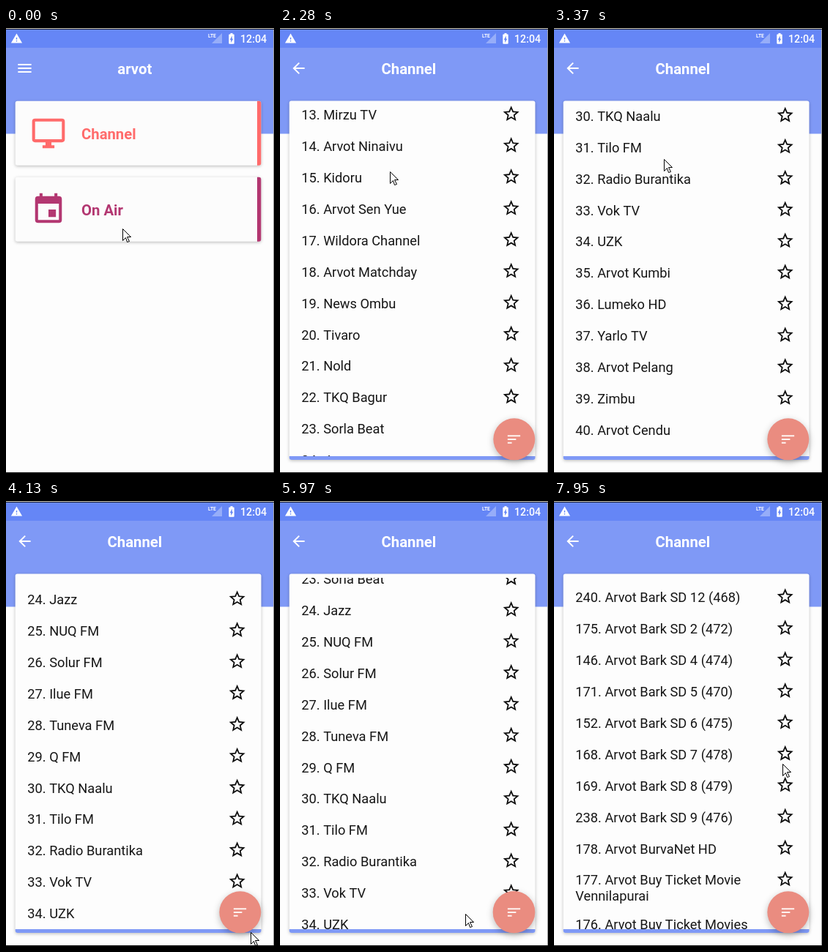
Write an HTML page with a canvas that moves like this. It is 366x608 px and loops after 8000 ms.

```html
<!DOCTYPE html>
<html lang="en">
<head>
<meta charset="utf-8">
<title>Channel list</title>
<style>
html, body { margin: 0; width: 100%; height: 100%; overflow: hidden; background: #fdfdfd; }
canvas { display: block; width: 366px; height: 608px; }
</style>
</head>
<body>
<canvas id="stage" width="366" height="608"></canvas>
<script>
const ctx = document.getElementById('stage').getContext('2d');
const LOOP = 8000, ROW = 42.9;
const BLUE = '#7f99f6', STATUS = '#6586f6', PAPER = '#fdfdfd';
const CORAL = '#ff6b6b', PLUM = '#b33771', SALMON = '#ea8c80';

const byId = 'QBU|Arvot Min Sao Kei|Arvot Lorma|Oru TV|Arvot Maarunal|KVD Lang Po|Fenwip Channel|Daymoor Channel|Arvot Bao Lin Sei|Arvot GrandMatch 2|KUX Movies|Arvot Dalima|Mirzu TV|Arvot Ninaivu|Kidoru|Arvot Sen Yue|Wildora Channel|Arvot Matchday|News Ombu|Tivaro|Nold|TKQ Bagur|Sorla Beat|Jazz|NUQ FM|Solur FM|Ilue FM|Tuneva FM|Q FM|TKQ Naalu|Tilo FM|Radio Burantika|Vok TV|UZK|Arvot Kumbi|Lumeko HD|Yarlo TV|Arvot Pelang|Zimbu|Arvot Cendu|Movie Tarn|Orvane HD|Arvot Tamu'
  .split('|').map((name, i) => `${i + 1}. ${name}`);

// The sorted list is only ever seen from this row on.
const FIRST = 22;
const byName = '61. Alumo|214. Alumo HD|34. Amvelu TV|207. Anduro HD|118. Aruvo|80. Arvot AHU|182. Arvot AHU HD|92. Arvot Andel|235. Arvot Andel HD|84. Arvot Avimo|77. Arvot Balfa|239. Arvot Bark (467)|148. Arvot Bark HD 3 (473)|119. Arvot Bark SD 1 (471)|173. Arvot Bark SD 10 (477)|242. Arvot Bark SD 11 (469)|240. Arvot Bark SD 12 (468)|175. Arvot Bark SD 2 (472)|146. Arvot Bark SD 4 (474)|171. Arvot Bark SD 5 (470)|152. Arvot Bark SD 6 (475)|168. Arvot Bark SD 7 (478)|169. Arvot Bark SD 8 (479)|238. Arvot Bark SD 9 (476)|178. Arvot BurvaNet HD|177. Arvot Buy Ticket Movie\nVennilapurai|176. Arvot Buy Ticket Movies'.split('|');

const smooth = u => u * u * (3 - 2 * u);
const easeOut = u => 1 - (1 - u) ** 3;
const ramp = (t, a, b) => Math.min(1, Math.max(0, (t - a) / (b - a)));

// Pointer moves; a drag also pulls the list, which coasts until `rest`.
const go = (start, end, x, y) => ({ start, end, x, y });
const drag = (start, end, x, y, rest) => ({ start, end, x, y, rest });
const moves = [
  go(60, 690, 143, 158),
  go(1040, 1340, 179, 209),
  go(1340, 1740, 190, 428),
  drag(1815, 2050, 150, 98, 2540),
  go(2100, 2560, 150, 385),
  drag(2710, 2850, 134, 75, 3370),
  go(2900, 3400, 150, 180),
  drag(3450, 3720, 190, 326, 4500),
  go(3750, 4130, 334, 589),
  go(4130, 4260, 352, 606),
  go(4260, 4610, 326, 566),
  go(5000, 5320, 254, 565),
  go(5900, 6450, 240, 543),
  drag(6590, 6965, 184, 30, 7290),
  go(6990, 7290, 205, 106),
  go(7350, 7650, 324, 365),
  go(7830, 7950, 312, 359)
];

// Coasting starts at the drag's own speed and slows down cubically.
function motion(t) {
  let x = 159, y = 274, scroll = 0;
  for (const m of moves) {
    if (t <= m.start) break;
    const u = ramp(t, m.start, m.end);
    if (m.rest) {
      const pull = y - m.y;
      const coast = pull / (m.end - m.start) * (m.rest - m.end) / 3;
      scroll += pull * u + coast * easeOut(ramp(t, m.end, m.rest));
    }
    const e = m.rest ? u : smooth(u);
    x += (m.x - x) * e;
    y += (m.y - y) * e;
  }
  return { x, y, scroll };
}

function rect(x, y, w, h, color) {
  ctx.fillStyle = color;
  ctx.fillRect(x, y, w, h);
}

function round(x, y, w, h, r, color, shadow = 0) {
  ctx.save();
  if (shadow) {
    ctx.shadowColor = 'rgba(0,0,0,.26)';
    ctx.shadowBlur = shadow * 2;
    ctx.shadowOffsetY = shadow * 0.6;
  }
  ctx.beginPath();
  ctx.roundRect(x, y, w, h, r);
  ctx.fillStyle = color;
  ctx.fill();
  ctx.restore();
}

function text(str, x, y, size, color, weight = 400, align = 'left') {
  ctx.font = `${weight} ${size}px Roboto, sans-serif`;
  ctx.textAlign = align;
  ctx.fillStyle = color;
  ctx.fillText(str, x, y);
}

function poly(...points) {
  points.forEach(([x, y], i) => i ? ctx.lineTo(x, y) : ctx.moveTo(x, y));
  ctx.closePath();
}

function starRing(outer, inner) {
  poly(...Array.from({ length: 10 }, (_, i) => {
    const r = i % 2 ? inner : outer, a = i * Math.PI / 5;
    return [12 + r * Math.sin(a), 12.5 - r * Math.cos(a)];
  }));
}

function bars(...widths) {
  widths.forEach((w, i) => ctx.rect(3, 6 + 5 * i, w, 2));
}

// Icons live on a 24-unit grid; overlapping parts cut holes.
const icons = {
  menu() { bars(18, 18, 18); },
  sort() { bars(18, 12, 6); },
  back() {
    poly([20, 11], [7.8, 11], [13.4, 5.4], [12, 4], [4, 12], [12, 20], [13.4, 18.6], [7.8, 13], [20, 13]);
  },
  screen() {
    ctx.roundRect(1, 2, 22, 16, 2);
    ctx.rect(3, 4, 18, 12);
    ctx.rect(10, 18, 4, 2);
    ctx.rect(8, 20, 8, 2);
  },
  event() {
    ctx.roundRect(3, 3, 18, 18, 2);
    ctx.rect(5, 8, 14, 11);
    ctx.rect(12, 12, 5, 5);
    for (const x of [6, 16]) ctx.rect(x, 1, 2, 2);
  },
  star() {
    starRing(10.5, 4.8);
    starRing(6.4, 2.9);
  },
  warn() {
    poly([1, 21], [12, 2], [23, 21]);
    ctx.rect(11, 10, 2, 4);
    ctx.rect(11, 16, 2, 2);
  },
  battery() {
    ctx.rect(10, 2, 4, 2);
    ctx.roundRect(7, 4, 10, 18, 1.3);
    poly([11, 20], [11, 14.5], [9, 14.5], [13, 7], [13, 12.5], [15, 12.5]);
  }
};

function icon(name, cx, cy, scale, color) {
  ctx.save();
  ctx.translate(cx, cy);
  ctx.scale(scale, scale);
  ctx.translate(-12, -12);
  ctx.beginPath();
  icons[name]();
  ctx.fillStyle = color;
  ctx.fill('evenodd');
  ctx.restore();
}

function ripple(x, y, w, h, cx, cy, u) {
  if (u <= 0 || u >= 1) return;
  ctx.save();
  ctx.beginPath();
  ctx.rect(x, y, w, h);
  ctx.clip();
  ctx.beginPath();
  ctx.arc(cx, cy, 20 + u * w, 0, 7);
  ctx.fillStyle = `rgba(0,0,0,${0.1 * (1 - u * u)})`;
  ctx.fill();
  ctx.restore();
}

function page(title, nav) {
  rect(0, 2, 366, 606, PAPER);
  rect(0, 27, 366, 117.5, BLUE);
  icon(nav, 25.5, 55, 1.014, '#fff');
  text(title, 175.8, 62.7, 20.3, '#fff', 700, 'center');
}

function homeCard(y, name, label, color) {
  round(12.7, y, 335.6, 88, 3, '#fcfcfc', 2);
  round(343, y, 5.3, 88, [0, 3, 3, 0], color);
  icon(name, 58, y + 44.3, 2.03, color);
  text(label, 103, y + 52, 20.3, color, 700);
}

function home(t) {
  page('arvot', 'menu');
  homeCard(99.7, 'screen', 'Channel', CORAL);
  homeCard(203.8, 'event', 'On Air', PLUM);
  ripple(13, 100, 335, 88, 143, 158, ramp(t, 940, 1290));
}

function list(rows, first, scroll) {
  ctx.save();
  ctx.beginPath();
  ctx.rect(13, 105, 335, 480);
  ctx.clip();
  let y = 129.5 + first * ROW - scroll;
  for (const row of rows) {
    const lines = row.split('\n');
    if (y > 60 && y < 610) {
      lines.forEach((line, i) => text(line, 29.3, y + 6.4 + i * 21.4, 18.25, '#161616'));
      icon('star', 315.7, y - 1.6, 1.1, '#0c0c0c');
    }
    y += ROW + (lines.length - 1) * 18;
  }
  ctx.restore();
}

function channels(t, scroll) {
  page('Channel', 'back');
  round(12.7, 99.6, 335.8, 490.4, 3, PAPER, 2);
  round(12.7, 585, 335.8, 5, [0, 0, 3, 3], BLUE);
  if (t < 5980) list(byId, 0, scroll);
  else list(byName, FIRST, scroll);
}

const menuOpen = t => smooth(ramp(t, 4830, 5130)) * (1 - smooth(ramp(t, 5740, 5980)));

function dim(h, open) {
  if (open > 0) rect(0, 2, 366, h, `rgba(0,0,0,${0.3 * open})`);
}

// The round button grows into the sort menu.
function sortMenu(t, open) {
  dim(605, open);
  const w = 57 + 147 * open, h = 57 + 57 * open;
  const x = 348.3 - w, y = 590.3 - h;
  round(x, y, w, h, 28.5 * (1 - open), SALMON, 4 * (1 - open) + 1);
  ctx.save();
  ctx.globalAlpha *= Math.max(0, 1 - open * 3);
  icon('sort', 319.5, 562, 0.96, '#fff3f0');
  ctx.globalAlpha = Math.max(0, open * 2 - 1);
  ctx.beginPath();
  ctx.rect(x, y, w, h);
  ctx.clip();
  text('Sort by ID', 160, 515, 16.4, '#fff6f4');
  text('Sort by Name', 160, 563.8, 16.4, '#fff6f4');
  ripple(144, 533, 204, 49, 254, 565, ramp(t, 5670, 5950));
  ctx.restore();
}

function statusBar(open) {
  rect(0, 2, 366, 25, STATUS);
  dim(25, open);
  icon('warn', 14.5, 14.3, 0.69, '#fff');
  ctx.beginPath();
  poly([295, 7], [295, 21], [281, 21]);
  ctx.fillStyle = 'rgba(255,255,255,.32)';
  ctx.fill();
  text('LTE', 276, 13, 6.6, '#fff', 700);
  icon('battery', 308, 14.3, 0.74, '#fff');
  text('12:04', 320, 19.6, 14.2, '#fff', 500);
}

function pointer(x, y) {
  ctx.save();
  ctx.translate(Math.round(x) + 0.5, Math.round(y) + 0.5);
  ctx.beginPath();
  poly([0, 0], [0, 16], [4, 12], [6, 18], [9, 17], [6, 11], [11, 11]);
  ctx.fillStyle = '#fff';
  ctx.fill();
  ctx.strokeStyle = '#000';
  ctx.stroke();
  ctx.restore();
}

function frame() {
  rect(0, 0, 366, 1, '#cfcfcf');
  rect(0, 1, 366, 1, '#151515');
  rect(0, 607, 366, 1, '#151515');
  rect(365, 2, 1, 605, '#a0a0a0');
}

function draw(t) {
  const { x, y, scroll } = motion(t);
  const enter = easeOut(ramp(t, 1010, 1290));
  const open = menuOpen(t);
  if (enter < 1) home(t);
  if (enter > 0) {
    ctx.save();
    ctx.globalAlpha = enter;
    ctx.translate(0, 40 * (1 - enter));
    channels(t, scroll);
    sortMenu(t, open);
    ctx.restore();
  }
  statusBar(open);
  frame();
  pointer(x, y);
}

function tick() {
  draw(performance.now() % LOOP);
  requestAnimationFrame(tick);
}
tick();
</script>
</body>
</html>
```
